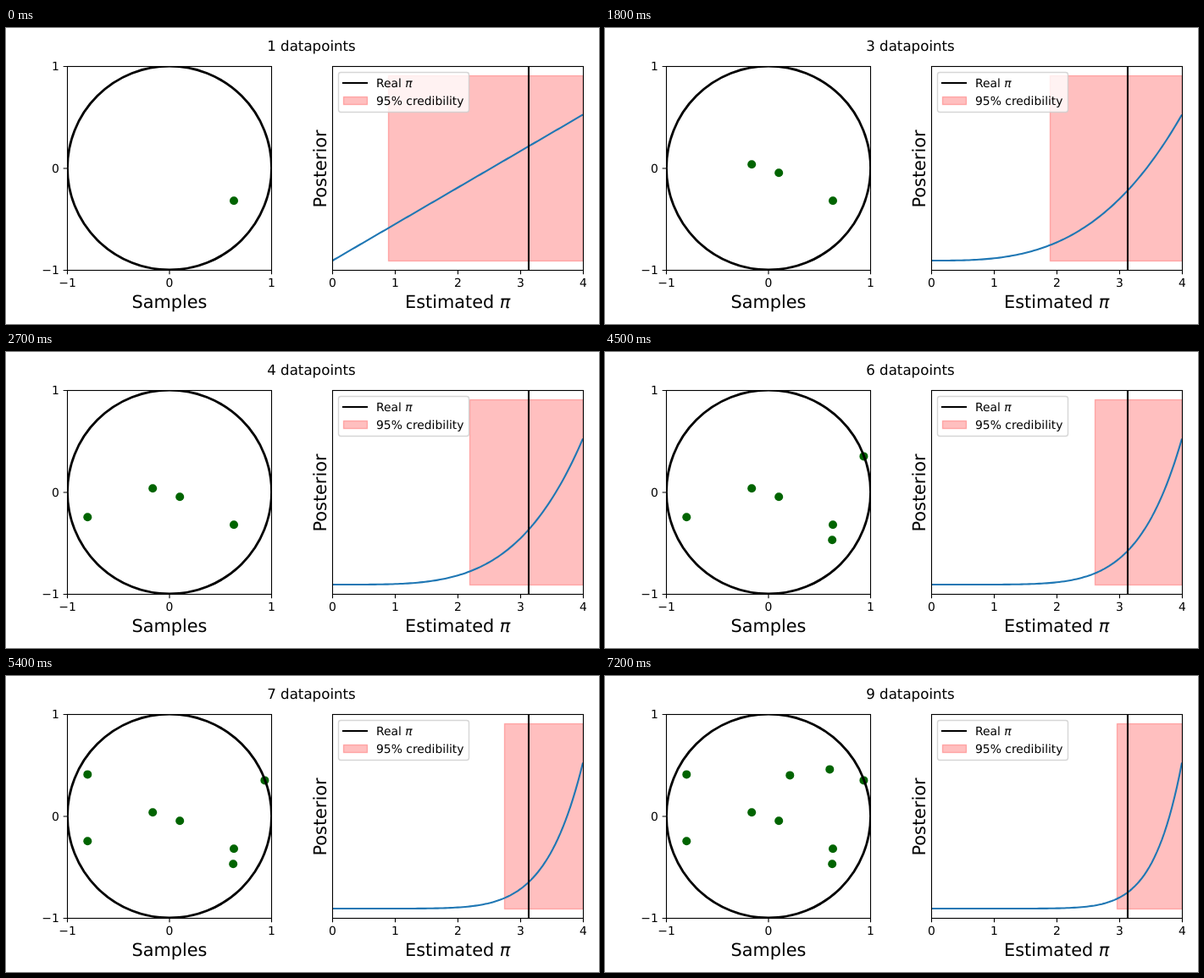
Write an HTML page that moves like this. It is 700 px wide and 350 px high and loops after 8000 ms.

```html
<!DOCTYPE html>
<html lang="en">
<head>
<meta charset="utf-8">
<title>Estimating pi</title>
<style>
  html, body { margin: 0; width: 100%; height: 100%; overflow: hidden; background: #fff; }
  svg { display: block; }
  text { font-family: "DejaVu Sans", sans-serif; font-size: 13.89px; fill: #000; text-rendering: geometricPrecision; }
  .mid { text-anchor: middle; }
  .end { text-anchor: end; }
  .label { font-size: 20.83px; }
  .title { font-size: 16.67px; }
  .pi { font-style: italic; }
  .axis { fill: none; stroke: #000; stroke-width: 1.11; }
  .band { fill: #f00; fill-opacity: .25; stroke: #f00; stroke-opacity: .25; stroke-width: 1.39; }
  .real { stroke: #000; stroke-width: 2.08; }
</style>
</head>
<body>
<svg width="700" height="350" viewBox="0 0 700 350">
  <defs>
    <clipPath id="leftClip"><rect x="72" y="45" width="241.5" height="241.5"/></clipPath>
    <clipPath id="rightClip"><rect x="385" y="45" width="296" height="241.5"/></clipPath>
  </defs>

  <text id="title" class="mid title" x="360.5" y="26.6"></text>

  <g clip-path="url(#leftClip)">
    <g id="dots" fill="#006400"></g>
    <circle cx="193" cy="165.5" r="120.5" fill="none" stroke="#000" stroke-width="2.78"/>
  </g>
  <rect class="axis" x="72.5" y="45.5" width="241" height="241"/>

  <g clip-path="url(#rightClip)">
    <rect id="band" class="band" y="56.5" height="219"/>
    <path id="curve" fill="none" stroke="#1f77b4" stroke-width="2.08" stroke-linejoin="round"/>
    <path class="real" d="M617 45V287"/>
  </g>
  <rect class="axis" x="385.5" y="45.5" width="296" height="241"/>

  <path id="ticks" class="axis"/>
  <g id="tickLabels"></g>

  <text class="mid label" x="193" y="331">Samples</text>
  <text class="mid label" x="533.2" y="331">Estimated <tspan class="pi">π</tspan></text>
  <text class="mid label" transform="translate(378 166.5) rotate(-90)">Posterior</text>

  <rect x="392.5" y="52.5" width="154" height="47" rx="2.8" fill="#fff" fill-opacity=".8" stroke="#ccc" stroke-opacity=".8" stroke-width="1.39"/>
  <path class="real" d="M397 65H427"/>
  <rect class="band" x="398.5" y="81.5" width="28" height="9"/>
  <text x="437" y="70">Real <tspan class="pi">π</tspan></text>
  <text x="437" y="90.5">95% credibility</text>
</svg>
<script>
const NS = "http://www.w3.org/2000/svg";
const STEP = 900, LOOP = 8000;
const X0 = 385.5, WIDTH = 295.5, BASE = 275, PEAK = 172.5;
const samples = [
  [269, 204.3], [205.2, 171.2], [173.2, 161.2], [96.3, 195.3], [268.2, 222.3],
  [305.4, 123.4], [96.3, 116.4], [265.3, 110.4], [218.3, 117.4]
];
const byId = id => document.getElementById(id);

function add(parent, tag, attrs, content = "") {
  const el = document.createElementNS(NS, tag);
  for (const key in attrs) el.setAttribute(key, attrs[key]);
  el.textContent = content;
  parent.appendChild(el);
  return el;
}

function drawTicks() {
  const labels = byId("tickLabels");
  let d = "";
  const bottom = (x, value) => {
    d += `M${x} 286.5v4.86`;
    add(labels, "text", { class: "mid", x, y: 306 }, value);
  };
  const side = (y, value) => {
    d += `M72.5 ${y}h-4.86`;
    add(labels, "text", { class: "end", x: 62.8, y: y + 4.7 }, value);
  };
  ["−1", "0", "1"].forEach((value, i) => {
    bottom(72.5 + 120.5 * i, value);
    side(286.5 - 120.5 * i, value);
  });
  for (let i = 0; i <= 4; i++) bottom(Math.floor(385.5 + 74 * i) + 0.5, i);
  byId("ticks").setAttribute("d", d);
}

// The posterior after n hits is proportional to (x / 4)^n.
function curvePath(n) {
  const points = [];
  for (let i = 0; i <= 100; i++) {
    const u = i / 100;
    points.push(`${(X0 + WIDTH * u).toFixed(2)} ${(BASE - PEAK * u ** n).toFixed(2)}`);
  }
  return "M" + points.join("L");
}

const dots = samples.map(([cx, cy]) => add(byId("dots"), "circle", { cx, cy, r: 5 }));
let shown = 0;

function render(time) {
  const n = Math.min(samples.length, Math.floor((time % LOOP) / STEP) + 1);
  if (n === shown) return;
  shown = n;
  byId("title").textContent = `${n} datapoints`;
  dots.forEach((dot, i) => dot.setAttribute("visibility", i < n ? "visible" : "hidden"));
  const left = Math.floor(X0 + WIDTH * 0.05 ** (1 / (n + 1))) + 0.5;
  byId("band").setAttribute("x", left);
  byId("band").setAttribute("width", 681.5 - left);
  byId("curve").setAttribute("d", curvePath(n));
}

drawTicks();
const start = performance.now();
function tick() {
  render(performance.now() - start);
  requestAnimationFrame(tick);
}
tick();
</script>
</body>
</html>
```
